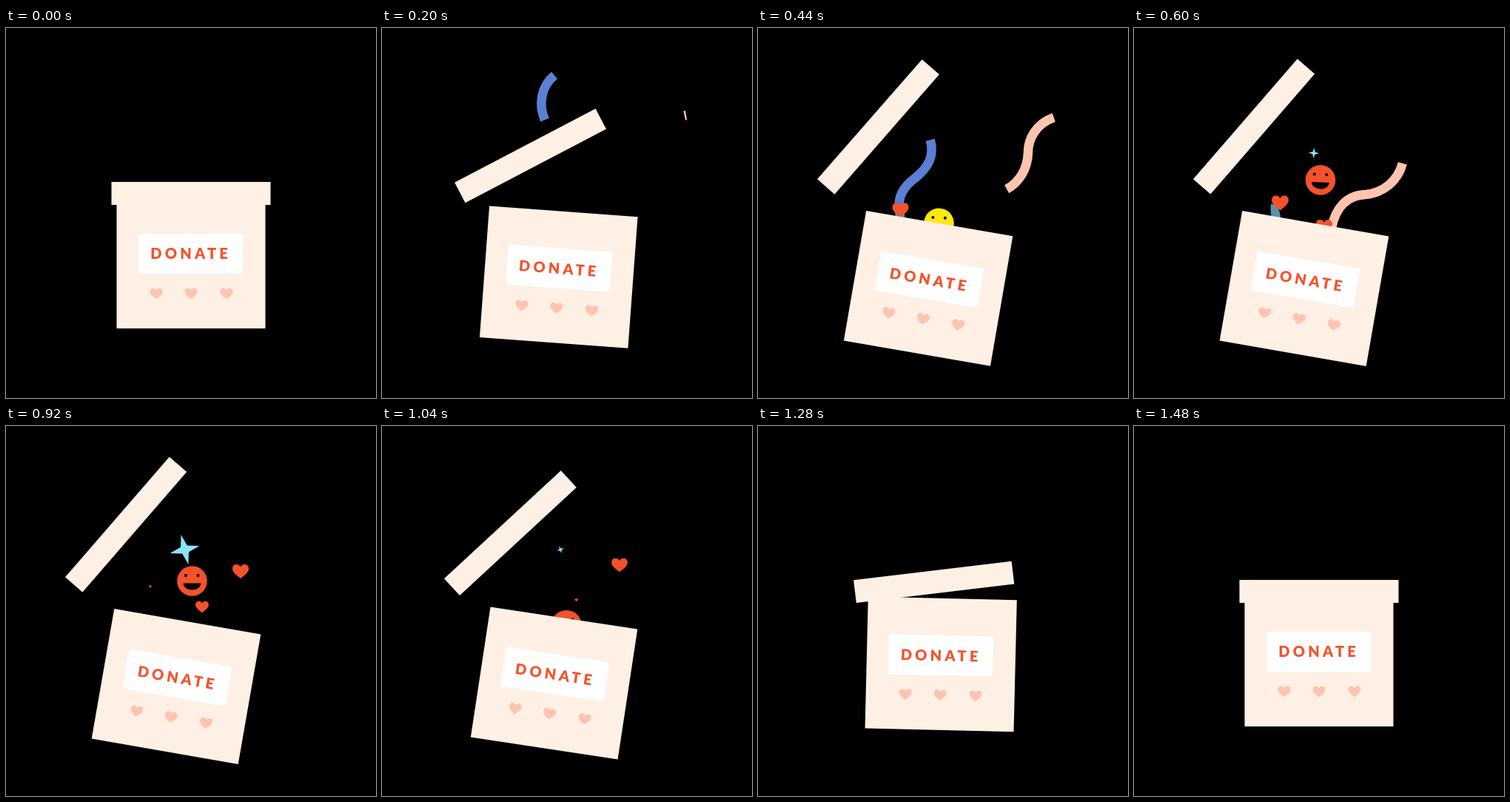
Write an HTML page that moves like this. It is 500x500 px and loops after 1.56 s.

```html
<!DOCTYPE html>
<html lang="en">
<head>
<meta charset="utf-8">
<title>Donate</title>
<style>
  html, body { margin: 0; width: 100%; height: 100%; overflow: hidden; background: #000; }
  svg { display: block; width: 100%; height: 100%; }

  /* --t is the current loop time in ms, set on each 40 ms tick */
  .anim {
    animation: 1560ms linear infinite paused;
    animation-delay: calc(var(--t, 0) * -1ms);
    transform-origin: 0 0;
  }
  .card { fill: #fef0e5; }
  .red { fill: #f4522c; }
  .pale { fill: #ffc4b0; }
  .ribbon { fill: none; stroke-width: 12.5; stroke-dasharray: 0 999; }
  text { font: 900 20px Lato, sans-serif; letter-spacing: 4.2px; }

  #body { animation-name: slide, tilt; }
  #lid { animation-name: lid; }
  #blue { animation-name: blue; stroke: #5b7fd3; }
  #pink { animation-name: pink; stroke: #ffc4b0; }
  #curl { animation-name: curl; fill: #5b93a8; }
  #star { animation-name: star; fill: #8be4f8; }
  #face { animation-name: face; }
  #skin { animation-name: skin; }
  #heartA { animation-name: heartA; }
  #heartB { animation-name: heartB; }
  #heartC { animation-name: heartC; }

  @keyframes slide {
    0% { translate: 250px 317px; animation-timing-function: cubic-bezier(.4,0,.3,1); }
    30.77% { translate: 230px 352px; }
    58.97% { translate: 230px 352px; animation-timing-function: cubic-bezier(.4,0,.35,1); }
    94.87%, 100% { translate: 250px 317px; }
  }
  @keyframes tilt {
    0% { rotate: 0deg; }
    2.56% { rotate: 0deg; animation-timing-function: cubic-bezier(.4,0,.3,1); }
    31.41% { rotate: 9.9deg; }
    58.97% { rotate: 9.9deg; animation-timing-function: cubic-bezier(.4,0,.35,1); }
    94.87%, 100% { rotate: 0deg; }
  }
  @keyframes lid {
    0% { translate: 250px 223.5px; rotate: 0deg; animation-timing-function: cubic-bezier(.4,0,.3,1); }
    30.77% { translate: 162.1px 133.1px; rotate: -49.1deg; }
    58.97% { translate: 162.1px 133.1px; rotate: -49.1deg; animation-timing-function: cubic-bezier(.4,0,.35,1); }
    94.87%, 100% { translate: 250px 223.5px; rotate: 0deg; }
  }
  @keyframes blue {
    0%, 6.67% { stroke-dasharray: 0 999; stroke-dashoffset: 0; }
    20.9% { stroke-dasharray: 153 999; stroke-dashoffset: 0; }
    38.4%, 100% { stroke-dasharray: 153 999; stroke-dashoffset: -230; }
  }
  @keyframes pink {
    0%, 12.56% { stroke-dasharray: 0 999; stroke-dashoffset: 0; }
    26.67% { stroke-dasharray: 120 999; stroke-dashoffset: 0; }
    38.46% { stroke-dasharray: 140 999; stroke-dashoffset: -89; }
    55.13%, 100% { stroke-dasharray: 140 999; stroke-dashoffset: -235; }
  }
  @keyframes curl {
    0%, 38.46% { translate: 0 0; }
    42%, 100% { translate: 2px 24px; }
    0%, 36.9%, 42%, 100% { visibility: hidden; }
    37%, 41.9% { visibility: visible; }
  }
  @keyframes star {
    0%, 35.9% { translate: 243px 170px; rotate: 8deg; scale: 0; }
    38.46% { translate: 243px 169px; rotate: 4deg; scale: .35; }
    47.4% { translate: 242px 167px; rotate: -7deg; scale: 1; }
    58.97% { translate: 241.5px 167px; rotate: -14deg; scale: 1; }
    69.2%, 100% { translate: 241px 167px; rotate: -22deg; scale: 0; }
  }
  @keyframes face {
    0%, 24.4% { translate: 243px 305px; rotate: 2deg; }
    28.2% { translate: 244.5px 264px; rotate: 3deg; animation-timing-function: ease-out; }
    34.6% { translate: 250px 207px; rotate: 3deg; }
    38.46% { translate: 252px 205.5px; rotate: 2deg; }
    58.97% { translate: 251.5px 209.5px; rotate: 0deg; animation-timing-function: ease-in; }
    69.2%, 100% { translate: 248px 305px; rotate: 0deg; }
  }
  @keyframes skin {
    0%, 33.3% { fill: #fde910; }
    33.31%, 100% { fill: #f4522c; }
  }
  @keyframes heartA {
    0%, 23.08% { translate: 190px 275px; scale: 0; }
    25.6% { translate: 190px 260px; scale: 1; }
    28.2% { translate: 192.5px 246px; scale: 1; }
    38.46% { translate: 197.5px 236.5px; scale: 1.04; }
    46.2% { translate: 198px 229px; scale: .9; }
    58.97% { translate: 195px 217px; scale: .17; }
    61%, 100% { translate: 195px 215px; scale: 0; }
  }
  @keyframes heartB {
    0%, 33.3% { translate: 254px 290px; scale: 0; }
    35.9% { translate: 255px 282px; scale: 1; }
    38.46% { translate: 257px 268.5px; scale: 1; }
    47.4% { translate: 263px 253px; scale: 1; }
    58.97% { translate: 265px 244.5px; scale: .81; }
    69.2%, 100% { translate: 262px 232px; scale: 0; }
  }
  @keyframes heartC {
    0%, 41% { translate: 300px 290px; scale: 0; }
    43.6% { translate: 303px 265px; scale: 1; }
    50% { translate: 311px 222px; scale: 1; }
    58.97% { translate: 317px 196.5px; scale: 1; }
    74.36% { translate: 325px 179.5px; scale: .97; }
    82%, 100% { translate: 327px 172px; scale: 0; }
  }
</style>
</head>
<body>
<svg viewBox="0 0 500 500">
  <defs>
    <path id="heart" d="M0 9.5C-4 6-11 2-11-3.5C-11-7.5-8.5-9.5-5.7-9.5C-3-9.5-1-8 0-6C1-8 3-9.5 5.7-9.5C8.5-9.5 11-7.5 11-3.5C11 2 4 6 0 9.5Z"/>
  </defs>

  <path id="blue" class="anim ribbon" d="M233 64C215 79 211 103 220 124C224 133 228 138 231 145C240 171 232 187 212 203C197 214 189 228 191 244L193 266"/>
  <path id="pink" class="anim ribbon" d="M411 118C378 124 365 148 365 168C364 200 342 222 313 225C286 226 272 245 267 270L266 280"/>
  <path id="curl" class="anim" d="M185 238C193 238 198 246 198 258L186 258Q184 247 185 238Z"/>

  <path id="star" class="anim" d="M0-20.5L4.5-4.5L20.5 0L4.5 4.5L0 20.5L-4.5 4.5L-20.5 0L-4.5-4.5Z"/>
  <g id="face" class="anim">
    <circle id="skin" class="anim" r="20.3"/>
    <circle cx="-8.5" cy="-7.6" r="2"/>
    <circle cx="8" cy="-7.6" r="2"/>
    <path d="M-12 3H12C11 15-11 15-12 3Z"/>
  </g>
  <use id="heartA" class="anim red" href="#heart"/>
  <use id="heartB" class="anim red" href="#heart"/>
  <use id="heartC" class="anim red" href="#heart"/>

  <g id="body" class="anim">
    <rect class="card" x="-100.5" y="-89" width="201" height="178"/>
    <rect x="-71" y="-39" width="141" height="54" fill="#fff"/>
    <text class="red" x="-54.7" y="-4.6">DONATE</text>
    <g class="pale">
      <use href="#heart" transform="translate(-47 42) scale(.78)"/>
      <use href="#heart" transform="translate(0 42) scale(.78)"/>
      <use href="#heart" transform="translate(48 42) scale(.78)"/>
    </g>
  </g>
  <rect id="lid" class="anim card" x="-107.5" y="-15.5" width="215" height="31"/>
</svg>
<script>
  const LOOP = 1560, TICK = 40;
  const root = document.documentElement;
  const start = performance.now();

  function draw() {
    const t = (performance.now() - start) % LOOP;
    root.style.setProperty('--t', Math.floor(t / TICK) * TICK);
    requestAnimationFrame(draw);
  }
  draw();
</script>
</body>
</html>
```
